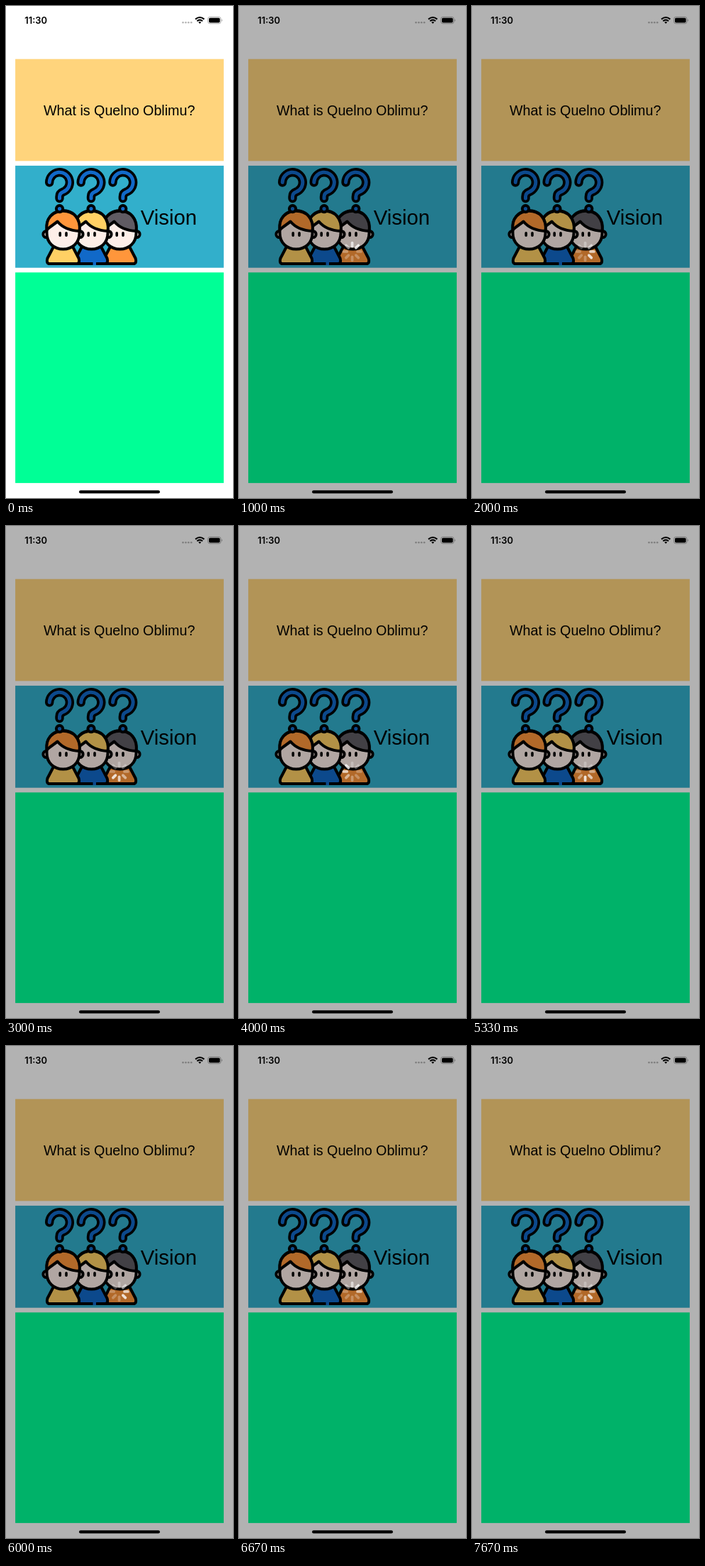
Animation, 320 px wide and 693 px high, one loop 8000 ms. Source, as an HTML page:

```html
<!DOCTYPE html>
<html lang="en">
<head>
<meta charset="utf-8">
<title>Cards with loading spinner</title>
<style>
  html, body { margin: 0; width: 100%; height: 100%; overflow: hidden; background: #fff; }
  svg { display: block; width: 320px; height: 693px; }
  .label { font-family: "Liberation Sans", Arial, sans-serif; }
  .clock { font: 600 12.9px Inter, sans-serif; }
  .ink { stroke: #000; stroke-width: 4; stroke-linejoin: round; stroke-linecap: round; }
</style>
</head>
<body>
<svg viewBox="0 0 320 693">
  <rect width="320" height="693" fill="#fff"/>

  <text class="clock" x="26.3" y="25">11:30</text>
  <g fill="#b4b4b4">
    <circle cx="249.5" cy="23.3" r="1.3"/><circle cx="253.4" cy="23.3" r="1.3"/>
    <circle cx="257.3" cy="23.3" r="1.3"/><circle cx="261.2" cy="23.3" r="1.3"/>
  </g>
  <g fill="none" stroke="#000" stroke-width="2.1">
    <path d="M267 18.6Q273.2 13.4 279.4 18.6M269.3 21.2Q273.2 18 277.1 21.2"/>
    <path d="M271.2 22.8Q273.2 21.3 275.2 22.8L273.2 25Z" fill="#000" stroke="none"/>
  </g>
  <rect x="284.6" y="15.4" width="18.4" height="9.4" rx="2.8" fill="none" stroke="#a6a6a6" stroke-width=".9"/>
  <rect x="286" y="16.8" width="15.6" height="6.6" rx="1.6"/>
  <path d="M304.1 18.4Q306 20.1 304.1 21.8Z" fill="#a6a6a6"/>

  <rect x="13.1" y="74.7" width="293.8" height="143.6" fill="#ffd47c"/>
  <rect x="13.1" y="224.9" width="293.8" height="143.8" fill="#32afcb"/>
  <rect x="13.1" y="375.3" width="293.8" height="296.6" fill="#00ff96"/>
  <text class="label" x="159.7" y="154" font-size="19.7" text-anchor="middle">What is Quelno Oblimu?</text>
  <text class="label" x="189.8" y="308" font-size="29.3">Vision</text>

  <g id="people"></g>
  <rect x="103" y="682.3" width="114" height="4.2" rx="2.1"/>

  <rect id="shade" width="320" height="693" fill="#000" opacity=".3"/>
  <g id="spinner" stroke="#fff" stroke-width="3.7" stroke-linecap="round" transform="translate(159.6 345.9)"></g>
</svg>
<script>
const LOOP = 8000, DIM_AT = 1000, FPS = 3;
const STEPS_PER_SECOND = 10, PHASE = -1.1, SPOKES = 8;
const BLUE = "#1169c8", YELLOW = "#ffd064", ORANGE = "#ff963b", GREY = "#5f5b63", SKIN = "#fdeee8";
const byId = id => document.getElementById(id);

function person(dx, hair, shirt) {
  return `<g class="ink" transform="translate(${dx} 0)">
    <path d="M67 339L58.4 355.5Q56.4 363 61.5 363H99.5Q104.6 363 102.6 355.5L94 339Z" fill="${shirt}"/>
    <circle cx="57" cy="321.5" r="4.6" fill="${SKIN}"/>
    <circle cx="104" cy="321.5" r="4.6" fill="${SKIN}"/>
    <path d="M57.5 312V320C57.5 334 68 342.5 80.5 342.5S103.5 334 103.5 320V312C103.5 280 57.5 280 57.5 312Z" fill="${SKIN}"/>
    <path d="M57.5 315.5C55.5 299 66 288.8 80.5 288.8S105.5 299 103.7 317C91 316.5 80 312.5 72.5 303.5C68.5 307.5 63 309.5 57.5 315.5Z" fill="${hair}"/>
    <path d="M76.2 319.8V323.2M85 319.8V323.2" stroke-width="3.6"/>
  </g>`;
}

function question(x) {
  const hook = `M${x - 14.3} 248.5A14.3 14.3 0 1 1 ${x + 5} 261.9Q${x} 263.8 ${x} 268.5V271`;
  const line = (color, width) =>
    `<path d="${hook}" fill="none" stroke="${color}" stroke-width="${width}" stroke-linecap="round"/>`;
  return line("#000", 12.4) + line(BLUE, 5) +
    `<circle class="ink" cx="${x}" cy="285.6" r="4.6" fill="${BLUE}"/>`;
}

byId("people").innerHTML =
  person(80, GREY, ORANGE) +
  person(40, YELLOW, BLUE) +
  `<path d="M122.5 363H127" stroke="${BLUE}" stroke-width="4.4"/>` +
  person(0, ORANGE, YELLOW) +
  [75.5, 120, 164.8].map(question).join("");

byId("spinner").innerHTML = Array.from({ length: SPOKES }, (_, i) =>
  `<path d="M0 -7.4V-12.3" transform="rotate(${i * 360 / SPOKES})"/>`).join("");
const spokes = [...byId("spinner").children];

// Each spoke lights up during the last step of its cycle, then fades over three steps.
function spokeOpacity(age) {
  const glow = age > SPOKES - 1 ? age - SPOKES + 1 : Math.max(0, 1 - age / 3.2);
  return 0.26 + 0.6 * glow;
}

function render(ms) {
  const dimmed = ms >= DIM_AT;
  byId("shade").style.display = byId("spinner").style.display = dimmed ? "" : "none";
  const seconds = Math.floor((ms + 4) * FPS / 1000) / FPS;
  const head = seconds * STEPS_PER_SECOND + PHASE;
  spokes.forEach((spoke, i) => {
    const age = ((head - i) % SPOKES + SPOKES) % SPOKES;
    spoke.setAttribute("opacity", spokeOpacity(age).toFixed(3));
  });
}

const start = performance.now();
function tick() {
  render((performance.now() - start) % LOOP);
  requestAnimationFrame(tick);
}
tick();
</script>
</body>
</html>
```
